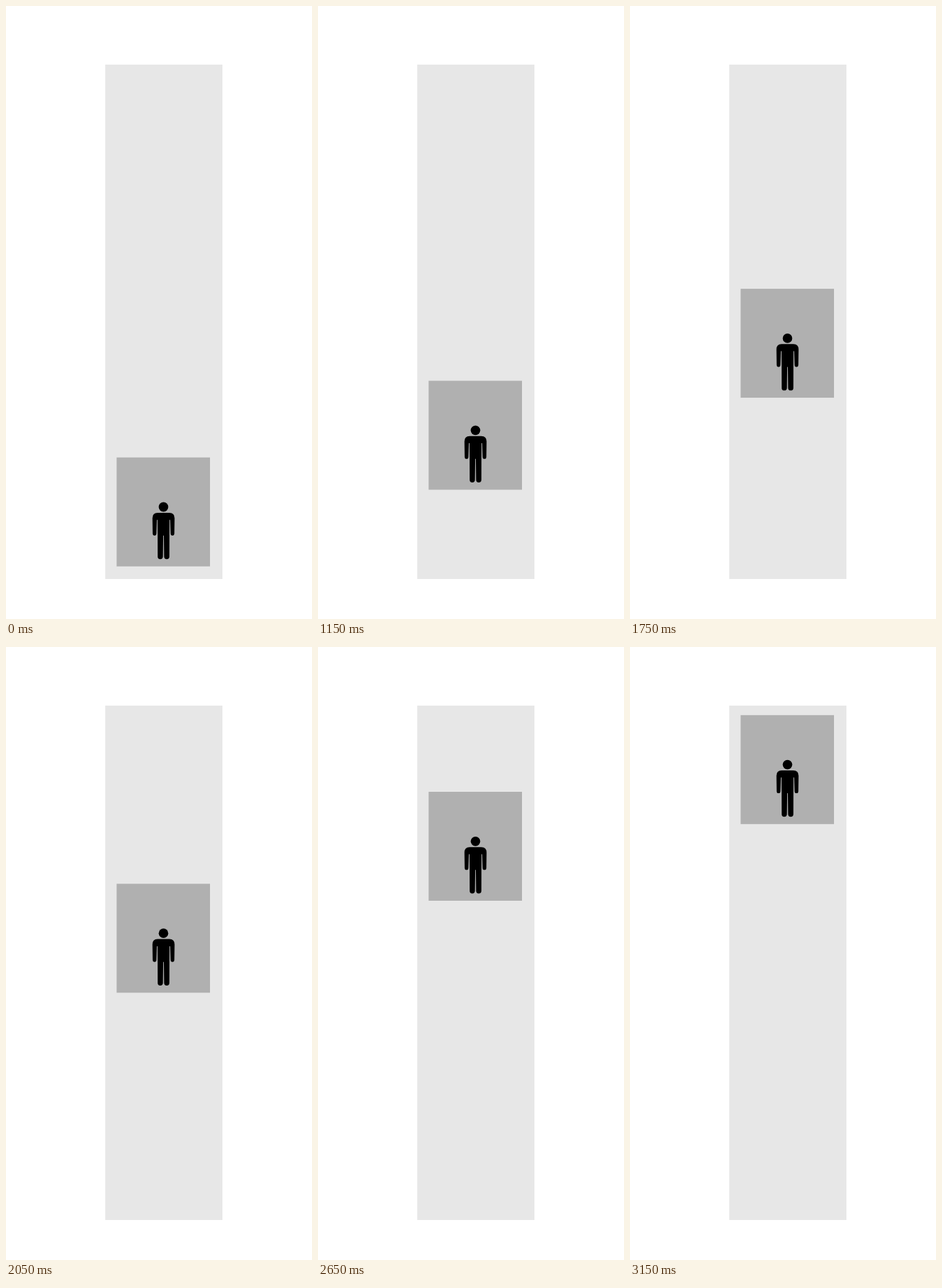
Write an HTML page that moves like this. It is 444 px wide and 889 px high and loops after 3900 ms.

```html
<!DOCTYPE html>
<html lang="en">
<head>
<meta charset="utf-8">
<title>Elevator</title>
<style>
  html, body { margin: 0; width: 100%; height: 100%; overflow: hidden; background: #fff; }
  svg { display: block; width: 100%; height: 100%; }
</style>
</head>
<body>
<svg viewBox="0 0 444 889">
  <rect x="144" y="85" width="170" height="746" fill="#e7e7e7"/>
  <g id="car">
    <rect x="160.5" width="135.5" height="158" fill="#b0b0b0"/>
    <circle cx="228.5" cy="71.8" r="6.9"/>
    <!-- shoulders, right arm, legs, left arm -->
    <path d="M220 80.2 H237 Q244.6 80.2 244.6 88 L244.3 110.4 Q244.2 113.3 241.5 113.3
      Q238.9 113.3 238.8 110.4 L238.2 90.5 H237.2 L237.1 143.8
      Q237 147.5 233.2 147.5 Q229.5 147.5 229.4 143.8 L229 113.3 H228.1 L227.7 143.8
      Q227.6 147.5 223.8 147.5 Q220.1 147.5 220.1 143.8 L219.9 90.5 H218.9
      L218.3 110.4 Q218.2 113.3 215.6 113.3 Q212.9 113.3 212.8 110.4 L212.5 88
      Q212.5 80.2 220 80.2 Z"/>
  </g>
</svg>
<script>
  const LOOP = 3900, FIRST_MOVE = 750, STEP_TIME = 100, STEPS = 25;
  const BOTTOM = 654.7, TOP = 98.8;
  const car = document.getElementById("car");
  const start = performance.now();

  function draw() {
    const time = (performance.now() - start) % LOOP;
    const step = Math.floor((time - FIRST_MOVE) / STEP_TIME) + 1;
    const progress = Math.min(Math.max(step, 0), STEPS) / STEPS;
    car.setAttribute("transform", `translate(0 ${BOTTOM + (TOP - BOTTOM) * progress})`);
    requestAnimationFrame(draw);
  }
  draw();
</script>
</body>
</html>
```
